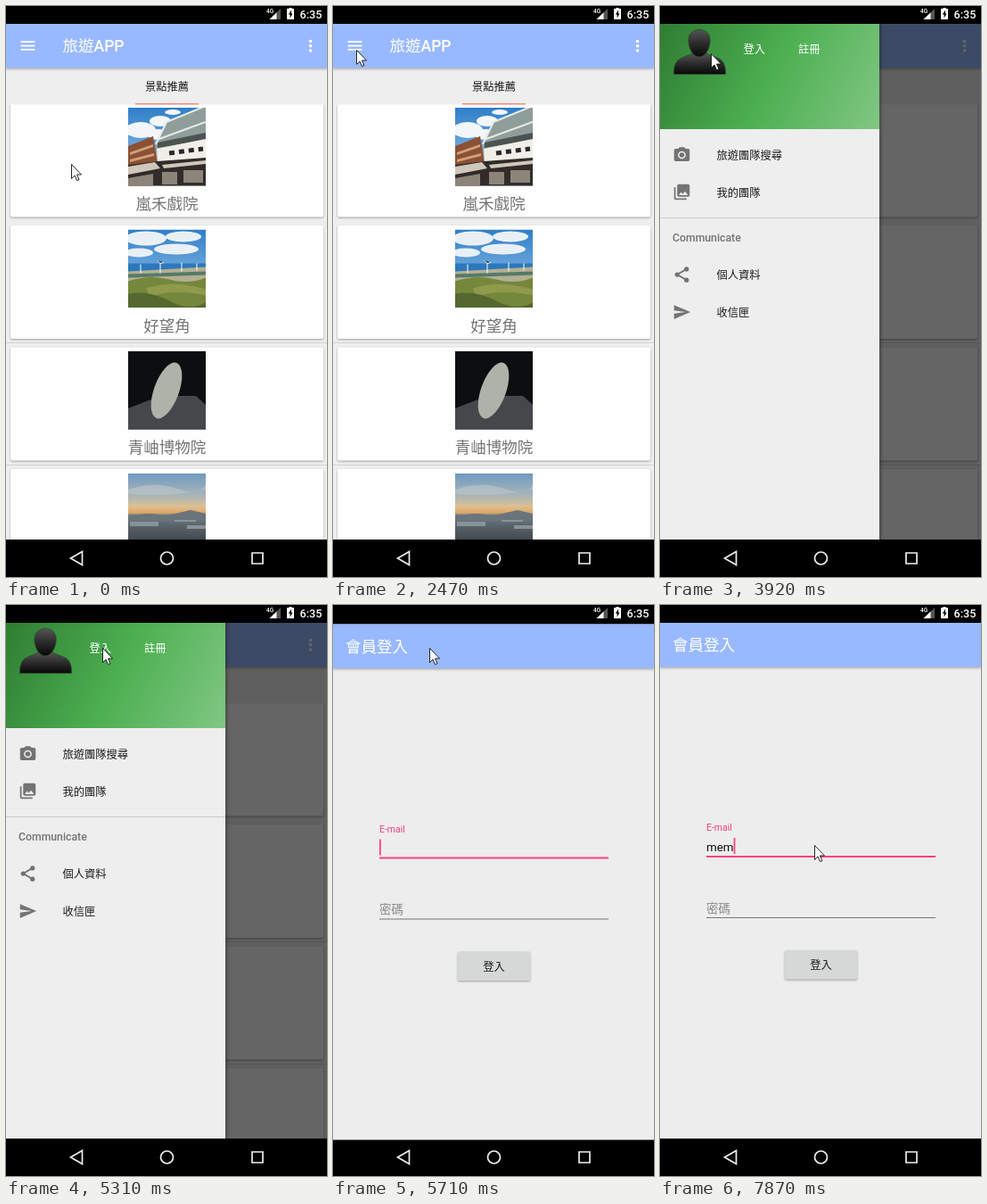
Recreate the animation shown at these times as an HTML page. Size 360 by 640 pixels, loop 8 s.

```html
<!DOCTYPE html>
<html lang="zh-Hant">
<head>
<meta charset="utf-8">
<title>旅遊APP</title>
<style>
  html, body { margin: 0; width: 100%; height: 100%; overflow: hidden; background: #000; }
  svg { display: block; width: 360px; height: 640px; }
  text { font: 12.25px Roboto, "Noto Sans CJK TC", "Noto Sans CJK SC", "Noto Sans CJK", sans-serif; }
  .title { font-size: 17.5px; font-weight: 500; fill: #fff; }
  .name { font-size: 17.5px; fill: #757575; text-anchor: middle; }
  .mid { text-anchor: middle; }
  .bold { font-weight: 500; fill: #1c1c1c; }
  .input { font-size: 13.4px; }
  .card { fill: #fefefe; filter: drop-shadow(0 1px 1px #0005); }
  .bar { fill: #99b9ff; filter: drop-shadow(0 1.5px 1.5px #0005); }
  .icon { fill: #737373; }
</style>
</head>
<body>
<svg viewBox="0 0 360 640">
  <defs>
    <linearGradient id="green" gradientUnits="userSpaceOnUse" x1="0" y1="20" x2="246" y2="138">
      <stop stop-color="#2e7d32"/><stop offset=".5" stop-color="#4caf50"/><stop offset="1" stop-color="#81c784"/>
    </linearGradient>
    <linearGradient id="gloss" x2="0" y2="1">
      <stop stop-color="#555"/><stop offset=".5" stop-color="#2b2b2b"/><stop offset="1" stop-color="#080808"/>
    </linearGradient>
    <linearGradient id="sky" x2="0" y2="1">
      <stop stop-color="#2f7fc9"/><stop offset="1" stop-color="#a9cdec"/>
    </linearGradient>
    <linearGradient id="dusk" x2="0" y2="1">
      <stop stop-color="#6f9ac0"/><stop offset=".28" stop-color="#a9b5b8"/><stop offset=".42" stop-color="#dcc093"/>
      <stop offset=".5" stop-color="#e2a661"/><stop offset=".53" stop-color="#76818a"/>
      <stop offset=".66" stop-color="#59636b"/><stop offset="1" stop-color="#2f3538"/>
    </linearGradient>
    <clipPath id="frame"><path d="M0 0H87V87.5H0Z"/></clipPath>
    <clipPath id="list"><path d="M0 110.500H360V598H0Z"/></clipPath>
    <clipPath id="panel"><path d="M0 20H260V598H0Z"/></clipPath>
  </defs>

  <g id="home">
    <path fill="#eee" d="M0 20H360V598H0Z"/>
    <g clip-path="url(#list)">
      <path stroke="#d2d2d2" d="M0 377.500H360M0 514.500H360"/>
      <g id="cards"></g>
      <g clip-path="url(#frame)" transform="translate(137 114)">
        <path fill="url(#sky)" d="M0 0H87V88H0Z"/>
        <g fill="#f3f6f8"><ellipse cx="14" cy="25" rx="17" ry="9"/><ellipse cx="36" cy="15" rx="12" ry="6"/><ellipse cx="34" cy="30" rx="12" ry="6"/><ellipse cx="50" cy="5" rx="9" ry="3"/></g>
        <path fill="#8c5034" d="M0 43L28 32L33 62L0 66Z"/>
        <path fill="#d1a078" d="M2 50L28 41V44L2 53ZM2 58L29 51V54L2 61Z"/>
        <path fill="#909e9b" d="M31 42L43 16L87 -2V50L32 58Z"/>
        <path fill="none" stroke="#e8ebe7" stroke-width="2" d="M31 41L43 16L87 -2M32 36L87 16"/>
        <path fill="#4d5350" d="M33 39L87 28V36L33 45Z"/>
        <path fill="#efeee7" d="M32 46L87 35V57L33 62Z"/>
        <path fill="none" stroke="#29282a" stroke-width="5" stroke-dasharray="6 5" d="M46 51L84 46"/>
        <path fill="#312c2a" d="M0 64L33 60L87 56V88H0Z"/>
        <path fill="#cfc7ba" d="M0 66L30 61L36 68L0 75ZM38 64L87 59V63L40 68Z"/>
        <path fill="#8d8479" d="M0 79L28 74V88H0ZM38 72H55V86H38ZM62 70H84V84H62Z"/>
      </g>
      <g clip-path="url(#frame)" transform="translate(137 250.500)">
        <path fill="url(#sky)" d="M0 0H87V88H0Z"/>
        <g fill="#e9f0f5"><ellipse cx="20" cy="10" rx="23" ry="8"/><ellipse cx="62" cy="8" rx="20" ry="6"/><ellipse cx="54" cy="22" rx="25" ry="6"/><ellipse cx="12" cy="26" rx="16" ry="5"/></g>
        <path fill="#2c78bd" d="M0 38H87V49H0Z"/>
        <path fill="#b5af91" d="M0 47L87 42V58H0Z"/>
        <path fill="#557a6a" d="M0 50L87 47V51L0 54Z"/>
        <path fill="#75873b" d="M0 58Q24 50 46 56T87 54V88H0Z"/>
        <path fill="#8f9a4d" d="M20 66Q48 56 87 67V74Q52 66 24 75Z"/>
        <path fill="#54682f" d="M0 72Q24 68 46 80T87 82V88H0Z"/>
        <path stroke="#fff" d="M14 49V39M36 49V37M60 47V37M77 46V38M33 35L36 38L40 37"/>
      </g>
      <g clip-path="url(#frame)" transform="translate(137 387)">
        <path fill="#0d0e10" d="M0 0H87V88H0Z"/>
        <path fill="#45474a" d="M0 64L36 50H76L87 60V88H0Z"/>
        <ellipse cx="43" cy="44" rx="14" ry="33" transform="rotate(20 43 44)" fill="#adb3a8"/>
      </g>
      <g clip-path="url(#frame)" transform="translate(137 524)">
        <path fill="url(#dusk)" d="M0 0H87V88H0Z"/>
        <path fill="#c7cdd0" opacity=".5" d="M0 18Q30 8 55 17T87 13V18Q50 26 0 23Z"/>
        <path fill="#69747d" d="M0 47L24 45L44 47L70 41L87 45V53H0Z"/>
        <path fill="#899296" d="M2 54H34V59H2ZM52 52H76V54H52ZM66 58H87V62H66Z"/>
      </g>
    </g>
    <text class="mid bold" x="180.500" y="95">景點推薦</text>
    <path fill="#f98b7b" d="M145 109H216V110.500H145Z"/>
    <path class="bar" d="M0 20H360V69.500H0Z"/>
    <path fill="#fff" transform="translate(14 34) scale(.875)" d="M3 18h18v-2H3zM3 13h18v-2H3zM3 8h18V6H3z"/>
    <text class="title" x="63.500" y="51">旅遊APP</text>
    <g fill="#fff"><circle cx="341.500" cy="39.500" r="1.800"/><circle cx="341.500" cy="44.700" r="1.800"/><circle cx="341.500" cy="50" r="1.800"/></g>
  </g>

  <path id="scrim" d="M0 20H360V598H0Z"/>

  <g id="drawer" clip-path="url(#panel)">
    <path fill="#eee" style="filter:drop-shadow(1px 0 2px #0006)" d="M0 10H246V610H0Z"/>
    <path fill="url(#green)" d="M0 20H246V138H0Z"/>
    <g fill="url(#gloss)" stroke="#2c4a2e" stroke-width=".8">
      <path d="M15.500 76.500Q15 61 25 58L37 53H51L64 58Q74 61 73.500 76.500Z"/>
      <path d="M44 26.500C53 26.500 57 33 56 41C55 50 50 57 44 57C38 57 33 50 32 41C31 33 35 26.500 44 26.500Z"/>
    </g>
    <g fill="#fff"><text x="93.500" y="52.500">登入</text><text x="155" y="52.500">註冊</text></g>
    <g class="bold">
      <text x="63.500" y="171.500">旅遊團隊搜尋</text><text x="63.500" y="213.500">我的團隊</text>
      <text x="63.500" y="305.500">個人資料</text><text x="63.500" y="347.500">收信匣</text>
    </g>
    <path stroke="#ccc" d="M0 237.500H246"/>
    <text class="bold" style="fill:#737373" x="14" y="263.500">Communicate</text>
    <g class="icon">
      <path transform="translate(14 156.500) scale(.875)" d="M9 2L7.200 4H4a2 2 0 0 0-2 2v12a2 2 0 0 0 2 2h16a2 2 0 0 0 2-2V6a2 2 0 0 0-2-2h-3.200L15 2zm3 15a5 5 0 1 1 0-10 5 5 0 0 1 0 10zm0-1.800a3.200 3.200 0 1 0 0-6.400 3.200 3.200 0 0 0 0 6.400z"/>
      <path transform="translate(14 198) scale(.875)" d="M22 16V4a2 2 0 0 0-2-2H8a2 2 0 0 0-2 2v12a2 2 0 0 0 2 2h12a2 2 0 0 0 2-2zm-11-4l2 2.700L16 11l4 5H8zM2 6v14a2 2 0 0 0 2 2h14v-2H4V6z"/>
      <g transform="translate(14 290.500) scale(.875)">
        <path fill="none" stroke="#737373" stroke-width="2" d="M18 5L6 12L18 19"/>
        <circle cx="18" cy="5" r="3"/><circle cx="6" cy="12" r="3"/><circle cx="18" cy="19" r="3"/>
      </g>
      <path transform="translate(14 332.500) scale(.875)" d="M2 21L23 12 2 3v7l15 2-15 2z"/>
    </g>
  </g>

  <g id="login">
    <path d="M0 0H360V640H0Z"/>
    <path fill="#ededed" d="M0 20H360V598H0Z"/>
    <path class="bar" d="M0 20H360V69.500H0Z"/>
    <text class="title" x="14" y="51">會員登入</text>
    <text x="52" y="253" style="font-size:10.5px" fill="#f04080">E-mail</text>
    <text id="typed" class="input" x="52" y="275.500" fill="#111"></text>
    <path id="caret" fill="#ff4081" d="M52 261H53.800V279H52Z"/>
    <path fill="#ff4081" d="M52 281H309V283H52Z"/>
    <text class="input" x="52" y="344.500" fill="#8c8c8c">密碼</text>
    <path stroke="#777" d="M52 350.500H309"/>
    <rect class="card" style="fill:#d6d7d7" x="140" y="387" width="81" height="32.500" rx="1.500"/>
    <text class="mid bold" x="180.500" y="408">登入</text>
  </g>

  <g id="system">
    <path d="M0 0H360V20H0Z"/>
    <path fill="#555" d="M295.500 15L308 15V3Z"/>
    <path fill="#fff" d="M295.500 15H303.500V7.300Z"/>
    <text x="292" y="8" fill="#fff" style="font-size:6.5px;font-weight:500">4G</text>
    <path fill="#fff" d="M317.500 3V2H320.500V3H323V15H315V3Z"/>
    <path d="M320 4.500L316.800 9.500H318.600V13.500L321.500 8.500H320Z"/>
    <text x="329.500" y="14" fill="#fff" style="font-size:12.6px;font-weight:500">6:35</text>
    <g fill="none" stroke="#eee" stroke-width="1.700">
      <path d="M72.500 619L85.500 611.500V626.500ZM276 613H288V625H276Z"/><circle cx="180.500" cy="619" r="7"/>
    </g>
  </g>
  <circle id="ripple" r="12" fill="#fff"/>
  <path id="cursor" fill="#fff" stroke="#111" stroke-width=".9" d="M.5.5V16.500L4 13L6.600 18.700L9 17.600L6.500 12H11.500Z"/>
</svg>
<script>
const LOOP = 8000;
const $ = id => document.getElementById(id);
const show = (id, on) => $(id).style.display = on ? '' : 'none';

$('cards').innerHTML = ['嵐禾戲院', '好望角', '青岫博物院', ''].map((name, i) => {
  const y = 109.500 + i * 136.500;
  return `<rect class="card" x="5" y="${y}" width="351" height="127" rx="2"/>
    <text class="name" x="180.500" y="${y + 118.500}">${name}</text>`;
}).join('');

// Pointer moves: first step, last step, number of steps, path
const moves = [
  [0, 0, 1, [[73, 177]]],
  [450, 600, 3, [[48, 160], [22, 146], [-30, 120]]],
  [920, 1230, 5, [[1, 75], [12, 62], [26, 49]]],
  [3920, 4160, 4, [[57, 53], [114, 58]]],
  [4380, 4460, 2, [[112, 54], [108, 48]]],
  [6060, 6820, 11, [[112, 54], [143, 98], [175, 175], [187, 230], [187, 289], [173, 269]]]
];
// Taps: start, end, x, y
const taps = [[2390, 2470, 26, 49], [4690, 5010, 107, 49], [5230, 5310, 107, 49]];

function along(path, p) {
  const s = p * (path.length - 1), i = Math.floor(s);
  const a = path[i], b = path[i + 1] || a;
  return a.map((v, k) => v + (b[k] - v) * (s - i));
}

function pointer(t) {
  const [start, end, steps, path] = moves.findLast(m => t >= m[0]);
  if (steps === 1) return path[0];
  const gap = (end - start) / (steps - 1);
  const step = Math.min(steps - 1, Math.floor((t - start) / gap + 1e-6));
  return along(path, step / (steps - 1));
}

function render(t) {
  show('drawer', t >= 3100);
  $('scrim').style.opacity = t < 3100 ? 0 : t < 3190 ? .08 : .6;

  show('login', t >= 5630);
  const rise = t < 5710 ? 16 : t < 5810 ? 1.5 : 0;
  $('login').setAttribute('transform', `translate(0 ${rise})`);
  $('login').style.opacity = t < 5710 ? .84 : 1;

  const typed = $('typed');
  typed.textContent = 'mem'.slice(0, [7640, 7720, 7870].filter(k => t >= k).length);
  const width = typed.textContent ? typed.getComputedTextLength() : 0;
  $('caret').setAttribute('transform', `translate(${width} 0)`);
  show('caret', t < 6060 || (t >= 6560 && t < 7050) || t >= 7560);

  const tap = taps.find(([from, to]) => t >= from && t < to);
  show('ripple', tap);
  if (tap) {
    const [from, to, x, y] = tap;
    $('ripple').setAttribute('transform', `translate(${x} ${y})`);
    $('ripple').style.opacity = .2 * (1 - (t - from) / (to - from));
  }
  $('cursor').setAttribute('transform', `translate(${pointer(t)})`);
}

function tick() {
  render(performance.now() % LOOP);
  requestAnimationFrame(tick);
}
tick();
</script>
</body>
</html>
```
